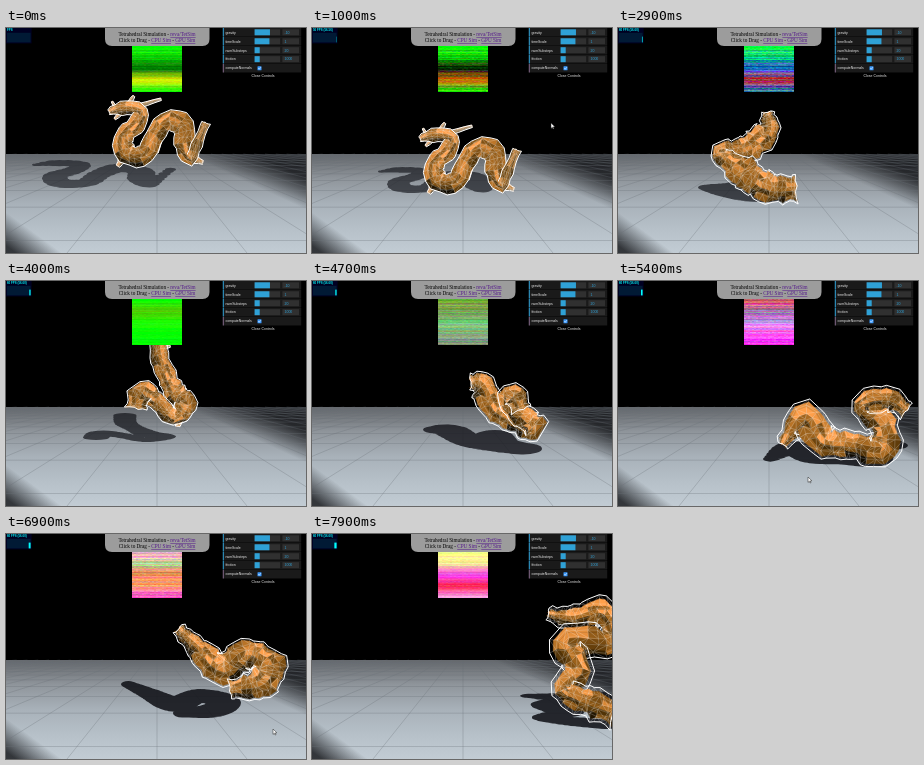
Animation of 300x225 px, one loop 8000 ms. Source, as an HTML page with a canvas:

```html
<!DOCTYPE html>
<html lang="en">
<head>
<meta charset="utf-8">
<title>Tetrahedral Simulation</title>
<style>
html, body { margin: 0; width: 100%; height: 100%; overflow: hidden; background: #000; }
canvas, svg { position: absolute; left: 0; top: 0; width: 300px; height: 225px; }
.info { font: 5.2px "Liberation Serif", serif; text-anchor: middle; }
.info .a { fill: #551a8b; text-decoration: underline; }
.gui { font: 3.5px "Liberation Sans", sans-serif; fill: #eee; }
.fps { font: bold 2.9px "Liberation Sans", sans-serif; fill: #0ff; }
</style>
</head>
<body>
<canvas id="view"></canvas>
<svg viewBox="0 0 300 225">
  <rect width="25.6" height="15.4" fill="#002"/>
  <rect x="1" y="4.8" width="23.6" height="9.6" fill="#011a35"/>
  <rect id="bars" y="8.6" height="5.8" fill="#0ff"/>
  <text id="fps" class="fps" x="1" y="3.4"></text>
  <path d="M99 0H203.5V11Q203.5 18 196.5 18H106Q99 18 99 11Z" fill="#9c9c9c"/>
  <g class="info">
    <text x="151" y="8.3">Tetrahedral Simulation - <tspan class="a">reva/TetSim</tspan></text>
    <text x="151" y="14.3">Click to Drag - <tspan class="a">CPU Sim</tspan> - <tspan class="a">GPU Sim</tspan></text>
  </g>
  <g id="gui" class="gui"></g>
</svg>
<script>
const LOOP = 8000, STEP = 100, EDGE = 126, RINGS = 46, SIDES = 5;
const $ = id => document.getElementById(id);
const mix = (a, b, u) => a + (b - a) * u;
const blend = (a, b, u) => a.map((v, i) => mix(v, b[i], u));
const rnd = (a, b = 0, c = 0) => {
  const s = Math.sin(a * 12.9898 + b * 78.233 + c * 37.719) * 43758.5453;
  return s - Math.floor(s);
};

// Control panel
const rows = [['gravity', .6, '-10'], ['timeScale', .58, '1'], ['numSubsteps', .2, '20'],
  ['friction', .2, '1000'], ['computeNormals']];
$('gui').innerHTML = '<rect x="216.8" width="78.4" height="51.2" fill="#000"/>' +
  rows.map(([name, fill, value], i) => {
    const y = i * 8.96;
    const bar = (x, w, color) => `<rect x="${x}" y="${y + 1.3}" width="${w}" height="6" fill="${color}"/>`;
    const control = value
      ? bar(248.6, 25.6, '#303030') + bar(248.6, 25.6 * fill, '#2fa1d6') + bar(276.4, 16.6, '#303030') +
        `<text x="278.5" y="${y + 5.6}" fill="#2fa1d6">${value}</text>`
      : `<rect x="251.5" y="${y + 2.4}" width="4" height="4" rx=".6" fill="#3b99fc"/>
         <path d="M252.3 ${y + 4.4}l.9 1 1.6-2" stroke="#fff" stroke-width=".6" fill="none"/>`;
    return `<rect x="216.8" y="${y}" width="78.4" height="8.64" fill="#1a1a1a"/>
      <rect x="216.8" y="${y}" width="1" height="8.64" fill="${value ? '#2fa1d6' : '#806787'}"/>
      <text x="219.4" y="${y + 5.6}">${name}</text>${control}`;
  }).join('') + '<text x="257" y="49.4" text-anchor="middle">Close Controls</text>';

// The body is a bent tube: a smooth curve through a few [x, y, radius] points
function spine(...keys) {
  const key = i => keys[Math.max(0, Math.min(keys.length - 1, i))];
  return Array.from({ length: RINGS }, (_, k) => {
    const s = k / (RINGS - 1) * (keys.length - 1), i = Math.min(keys.length - 2, Math.floor(s)), u = s - i;
    const [a, b, c, d] = [-1, 0, 1, 2].map(j => key(i + j));
    return b.map((v, n) => v + u * ((c[n] - a[n]) / 2 + u * (a[n] - 2.5 * v + 2 * c[n] - d[n] / 2 +
      u * (1.5 * (v - c[n]) + (d[n] - a[n]) / 2))));
  });
}
const shift = (body, dx, dy) => body.map(([x, y, r]) => [x + dx, y + dy, r]);

const dragon = spine([103, 84, 3], [117, 80, 7], [135, 83, 7], [130, 97, 8], [117, 110, 9], [121, 127, 10],
  [139, 126, 9], [149, 106, 9], [163, 91, 10], [178, 99, 10], [179, 118, 10], [185, 131, 6],
  [192, 114, 5], [200, 95, 4]);
const landed = shift(dragon, 5, 27);

// time, body, inset of the skin, limb size, shadow alpha and box
const poses = [
  [0, dragon, [.5, 1, .6, 26, 132, 170, 160]],
  [400, landed, [.5, 1, .65, 66, 139, 195, 165]],
  [1900, landed, [.5, 1, .65, 66, 139, 195, 165]],
  [2900, spine([149, 84, 6], [150, 103, 12], [128, 121, 13], [101, 124, 8], [125, 143, 15], [150, 160, 14],
    [178, 161, 13]), [2, .2, .7, 80, 146, 172, 174]],
  [4000, spine([152, 40, 9], [153, 72, 9], [162, 97, 9], [170, 114, 11], [180, 124, 11], [168, 137, 8],
    [150, 120, 9], [135, 111, 11], [130, 127, 10]), [1.2, .4, .7, 77, 132, 170, 161]],
  [5400, spine([165, 164, 7], [187, 136, 17], [205, 160, 15], [232, 164, 14], [264, 168, 16], [264, 143, 15],
    [243, 124, 11], [270, 118, 12], [288, 130, 9]), [3, 0, .88, 145, 155, 290, 186]],
  [6900, spine([172, 95, 7], [192, 114, 11], [217, 136, 16], [240, 119, 14], [264, 131, 16], [254, 149, 15],
    [224, 155, 9]), [2, .2, .88, 115, 147, 235, 184]],
  [7900, spine([236, 80, 7], [262, 84, 13], [292, 78, 14], [300, 106, 16], [255, 108, 16], [268, 136, 16],
    [250, 155, 11], [275, 168, 15], [302, 178, 16]), [4, .6, .88, 208, 157, 312, 195]]
];
// ring, direction and width of horns, jaw and feet
const limbs = [[5, 29, -9, 3], [4, 8, -12, 3], [2, -4, -8, 2], [4, -11, 11, 3], [17, -8, 12, 5],
  [26, -6, 28, 5], [37, 14, 5, 5]];

const cursor = [[1000, [239, 95]], [1700, [238, 95]], [2200, [158, 88]], [5000, [185, 182]],
  [5400, [190, 196]], [5900, [210, 203]], [6900, [267, 195]]];
const bands = [
  [0, '0f0 1c0 070 de0 1f0', .25],
  [1000, '0f0 1c0 120 c60 1e0', .45],
  [2900, '0f4 0c8 36c a24 28a', .6],
  [4000, '0f0 5c0 2f0 0f0 0f0', .15],
  [5400, 'd46 a7a c9e f5f f3e', .45],
  [6900, 'f9c bd9 f85 f97 f5c', .4],
  [7900, 'ff8 fe9 f4e f25 fae', .25]
].map(([t, colors, noise]) =>
  [t, [noise, ...[...colors.replaceAll(' ', '')].map(d => parseInt(d, 16) * 17)]]);

function span(keys, t) {
  let i = 0;
  while (i < keys.length - 2 && t >= keys[i + 1][0]) i++;
  const a = keys[i], b = keys[i + 1];
  return [a, b, Math.min(1, Math.max(0, (t - a[0]) / (b[0] - a[0])))];
}
function at(keys, t) {
  const [a, b, u] = span(keys, t);
  return blend(a[1], b[1], u);
}

const dpr = window.devicePixelRatio || 1;
function layer(c = document.createElement('canvas')) {
  c.width = 300 * dpr;
  c.height = 225 * dpr;
  const ctx = c.getContext('2d');
  ctx.scale(dpr, dpr);
  ctx.lineJoin = 'round';
  return ctx;
}
const g = layer($('view')), floor = layer();

function trace(pts) {
  g.beginPath();
  pts.forEach(p => g.lineTo(...p));
  g.closePath();
}

function paintFloor(c) {
  const wash = (line, ...stops) => {
    const fill = c.createLinearGradient(...line);
    stops.forEach((s, i) => fill.addColorStop(i / (stops.length - 1), s));
    c.fillStyle = fill;
    c.fillRect(0, EDGE, 300, 99);
  };
  c.fillRect(0, 0, 300, 225);
  wash([0, EDGE, 0, 225], '#64676b', '#8f959b', '#a8b1b9', '#b6c0c8', '#c2ccd4');
  // The lamp's cone leaves two corners dark
  wash([251, 159, 263, 133], 'rgba(12,13,16,0)', 'rgba(12,13,16,.78)');
  wash([26, 203, 10, 225], 'rgba(12,13,16,0)', 'rgba(12,13,16,.78)');
  c.strokeStyle = 'rgba(104,111,119,.6)';
  c.lineWidth = .5;
  c.beginPath();
  for (let d = 2; d < 15; d++) {
    c.moveTo(0, 112.5 + 200 / d);
    c.lineTo(300, 112.5 + 200 / d);
  }
  for (let i = -14; i <= 14; i++) {
    c.moveTo(151 + i * 10.8, EDGE);
    c.lineTo(151 + i * 90, 225);
  }
  c.stroke();
}
paintFloor(floor);

function paintShadow(body, alpha, [x0, y0, x1, y1]) {
  const low = n => Math.min(...body.map(p => p[n] - p[2]));
  const high = n => Math.max(...body.map(p => p[n] + p[2]));
  const l = low(0), t = low(1), sx = (x1 - x0) / (high(0) - l), sy = (y1 - y0) / (high(1) - t);
  g.beginPath();
  for (const [x, y, r] of body) {
    const cx = x0 + (x - l) * sx, cy = y0 + (y - t) * sy;
    g.moveTo(cx + r * sx, cy);
    g.ellipse(cx, cy, r * sx, r * sy, 0, 0, 7);
  }
  g.fillStyle = `rgba(18,19,25,${alpha})`;
  g.fill('nonzero');
}

function line(pts, width, alpha) {
  g.beginPath();
  pts.forEach(p => g.lineTo(...p));
  g.lineWidth = width;
  g.strokeStyle = `rgba(255,255,255,${alpha})`;
  g.stroke();
}

// Lit facets and white wires, ring by ring, so nearer coils cover farther ones
function paintTube(body, inset, seed = 0) {
  const dir = body.map((_, k) => {
    const a = body[Math.max(0, k - 1)], b = body[Math.min(body.length - 1, k + 1)];
    const dx = b[0] - a[0], dy = b[1] - a[1], len = Math.hypot(dx, dy) || 1;
    return [dx / len, dy / len];
  });
  const ring = (k, trim) => Array.from({ length: SIDES + 1 }, (_, m) => {
    const [x, y, r] = body[k], [tx, ty] = dir[k];
    const across = (m / SIDES * 2 - 1) * Math.max(.5, r * (.85 + .35 * rnd(k, m, seed)) - trim);
    const along = (rnd(k, m, seed + 4) - .5) * r * .35;
    return [x - ty * across + tx * along, y + tx * across + ty * along];
  });
  for (let k = 0; k < body.length - 1; k++) {
    const a = ring(k, inset), b = ring(k + 1, inset), A = ring(k, 0), B = ring(k + 1, 0);
    for (let m = 0; m < SIDES; m++) {
      const u = (m + .5) / SIDES * 2 - 1;
      const v = Math.max(.07, Math.min(1, .72 - dir[k][0] * u * .32 - Math.abs(u) * .15 +
        (rnd(k >> 1, m, seed + 2) - .5) * .6));
      trace([a[m], a[m + 1], b[m + 1], b[m]]);
      g.fillStyle = g.strokeStyle = `rgb(${v * 255 | 0},${v * 160 | 0},${v * v * 75 | 0})`;
      g.lineWidth = .4;
      g.fill();
      g.stroke();
    }
    for (let m = 0; m < SIDES; m++) {
      const flip = rnd(k, m, 8) > .5;
      line(flip ? [A[m], B[m + 1]] : [B[m], A[m + 1]], .4, .55);
      if (m) line([A[m], B[m]], .4, .5);
    }
    line(A, .45, .55);
    line([A[0], B[0]], 1, 1);
    line([A[SIDES], B[SIDES]], 1, 1);
  }
  line(ring(0, 0), 1, 1);
  line(ring(body.length - 1, 0), 1, 1);
}

function paintBody(t) {
  const [a, b, u] = span(poses, t);
  const e = b[0] === 400 ? u * u : mix(u, u * u * (3 - 2 * u), .5);
  const body = a[1].map((p, i) => blend(p, b[1][i], e));
  const [inset, size, alpha, ...box] = blend(a[2], b[2], e);
  paintShadow(body, alpha, box);
  limbs.forEach(([k, dx, dy, r], i) => {
    const [x, y] = body[k];
    const limb = [0, .25, .5, .75, 1].map(s =>
      [x + dx * s * size, y + dy * s * size, mix(r, r * .4, s)]);
    paintTube(limb, inset * .3, i + 20);
  });
  paintTube(body, inset);
}

const tile = document.createElement('canvas');
tile.width = 50;
tile.height = 46;
const tg = tile.getContext('2d'), image = tg.createImageData(50, 46);
function paintTile(t) {
  const [noise, ...c] = at(bands, t);
  for (let y = 0; y < 46; y++) {
    const v = y / 45 * 3.999, k = Math.floor(v);
    for (let x = 0; x < 50; x++) for (let ch = 0; ch < 4; ch++) {
      const base = mix(c[k * 3 + ch], c[k * 3 + 3 + ch], v - k);
      const grain = (rnd(y, ch, 2) - .5) * 170 + (rnd(x >> 1, y, ch + 4) - .5) * 90;
      image.data[(y * 50 + x) * 4 + ch] = ch === 3 ? 255 : base + grain * noise;
    }
  }
  tg.putImageData(image, 0, 0);
  g.drawImage(tile, 126, 18);
}

function paintCursor(t) {
  if (t < 1000 || (t > 2200 && t < 5000) || t > 7200) return;
  const [x, y] = at(cursor, t);
  trace([[0, 0], [0, 5.4], [1.3, 4.2], [2.1, 6], [3, 5.6], [2.2, 3.9], [3.9, 3.8]]
    .map(p => [x + p[0], y + p[1]]));
  g.fillStyle = '#fff';
  g.strokeStyle = '#222';
  g.lineWidth = .5;
  g.fill();
  g.stroke();
}

function render(t) {
  g.drawImage(floor.canvas, 0, 0, 300, 225);
  paintBody(t);
  paintTile(t);
  paintCursor(t);
  const n = Math.floor(t / 1000), w = n * .32;
  $('bars').setAttribute('x', 24.6 - w);
  $('bars').setAttribute('width', w);
  $('fps').textContent = n < 1 ? 'FPS' : n < 2 ? '56 FPS (56-56)' : '60 FPS (56-60)';
}

const start = performance.now();
let last = -1;
function tick() {
  const t = Math.floor((performance.now() - start) % LOOP / STEP) * STEP;
  if (t !== last) render(last = t);
  requestAnimationFrame(tick);
}
tick();
</script>
</body>
</html>
```
